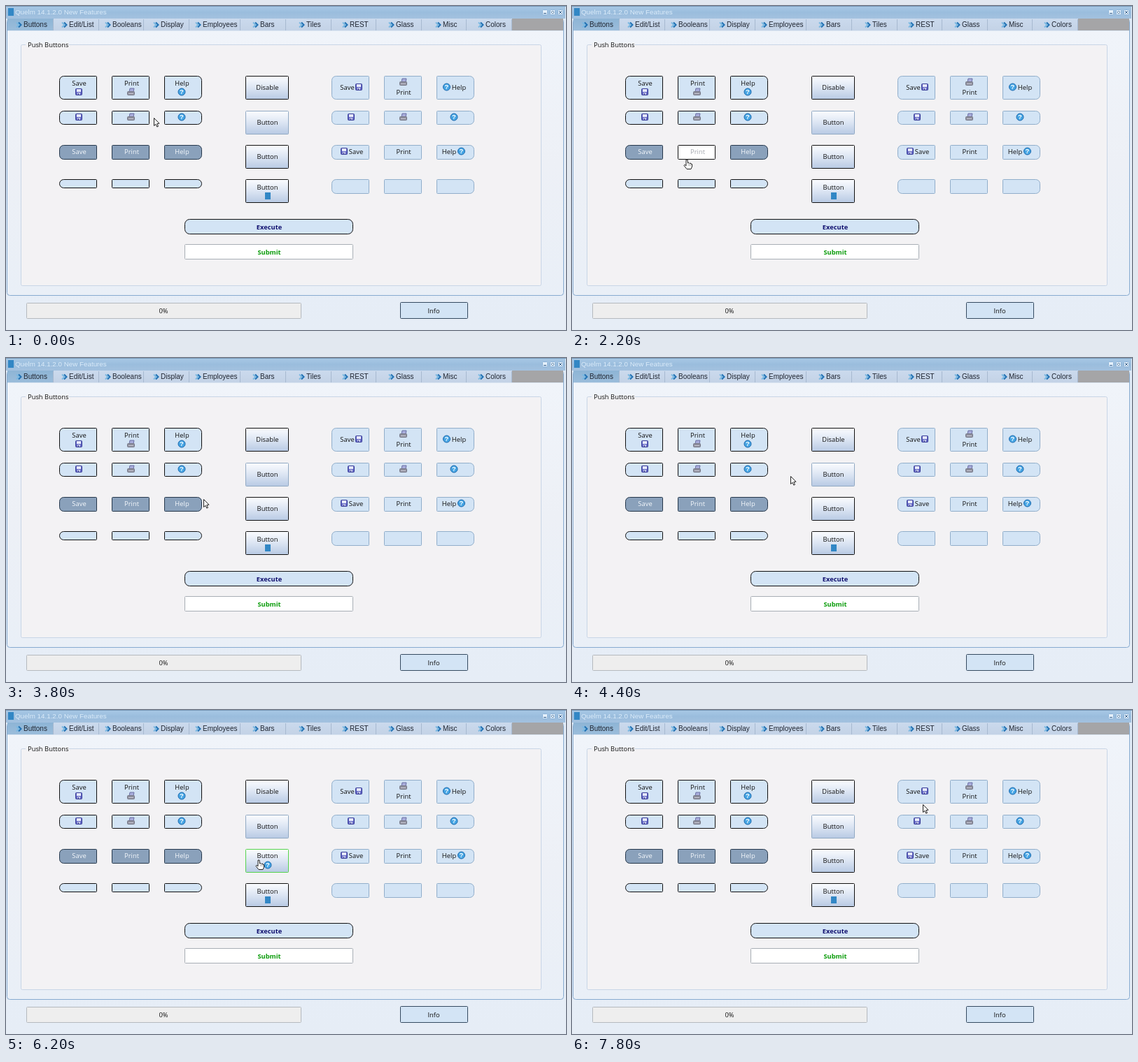
An HTML page with a canvas that plays this animation: 800 px wide and 464 px high, repeating every 8 s.

```html
<!DOCTYPE html>
<html lang="en">
<head>
<meta charset="utf-8">
<title>Button features</title>
<style>
  html, body { margin: 0; width: 100%; height: 100%; overflow: hidden; }
  canvas { display: block; width: 800px; height: 464px; }
</style>
</head>
<body>
<canvas id="stage" width="800" height="464"></canvas>
<script>
const ctx = document.getElementById('stage').getContext('2d');
const LOOP = 8000, STEP = 200;
const UI = '9.4px "Open Sans", sans-serif';
const BOLD = 'bold 9.3px "Open Sans", sans-serif';
const ARIAL = '10px "Liberation Sans", Arial, sans-serif';
const PALE = '#d3e4f5', DIM = '#8aa1bb';

// Pointer waypoints: time, x, y
const PATH = [
  [0, 211, 160], [1200, 106, 162], [1700, 108, 210], [2200, 164, 220], [2600, 250, 214],
  [3000, 242, 247], [4400, 312, 169], [5200, 364, 168], [6200, 361, 215],
  [6800, 370, 262], [7800, 501, 135]
];

// Name, left edge, chevron position
const tabs = [
  ['Buttons', 2, 14], ['Edit/List', 68, 79], ['Booleans', 133, 141], ['Display', 197, 210],
  ['Employees', 262, 270], ['Bars', 335, 352], ['Tiles', 400, 418], ['REST', 465, 480],
  ['Glass', 529, 546], ['Misc', 594, 613], ['Colors', 658, 674]
];
const labels = ['Save', 'Print', 'Help'];
const corners = [[6, 1, 1, 6], 1, [1, 6, 6, 1]];

function gradient(y0, y1, ...colors) {
  const g = ctx.createLinearGradient(0, y0, 0, y1);
  colors.forEach((c, i) => g.addColorStop(i / (colors.length - 1), c));
  return g;
}

function fillRect(x, y, w, h, fill) {
  ctx.fillStyle = fill;
  ctx.fillRect(x, y, w, h);
}

function box(x, y, w, h, fill, stroke, radius = 1) {
  ctx.beginPath();
  ctx.roundRect(x + .5, y + .5, w - 1, h - 1, radius);
  ctx.fillStyle = fill;
  ctx.fill();
  ctx.strokeStyle = stroke;
  ctx.lineWidth = 1;
  ctx.stroke();
}

function text(str, x, y, color = '#111', font = UI, align = 'center') {
  ctx.font = font;
  ctx.fillStyle = color;
  ctx.textAlign = align;
  ctx.fillText(str, x, y + 3.4);
}

function shape(points, fill, stroke, close = true) {
  ctx.beginPath();
  for (const [x, y] of points) ctx.lineTo(x, y);
  if (close) ctx.closePath();
  if (fill) { ctx.fillStyle = fill; ctx.fill(); }
  if (stroke) { ctx.strokeStyle = stroke; ctx.stroke(); }
}

const icons = {
  Save(x, y) {
    box(x - 5, y - 5, 10, 10, '#6367c4', '#3a3e98');
    fillRect(x - 3, y - 4, 6, 4, '#e6e9fb');
    fillRect(x - 2, y + 1, 4, 3, '#c2c5e6');
    fillRect(x - 1, y + 2, 1, 2, '#34388f');
  },
  Print(x, y) {
    shape([[x - 2, y - 5], [x + 4, y - 5], [x + 3, y], [x - 3, y]], '#a9addb', '#6b70a5');
    box(x - 6, y - 1, 11, 6, '#8f909f', '#777987');
    fillRect(x - 4, y + 2, 7, 1, '#c9c9d4');
  },
  Help(x, y) {
    ctx.beginPath();
    ctx.arc(x, y, 5, 0, 7);
    ctx.fillStyle = '#45a5e4';
    ctx.fill();
    ctx.strokeStyle = '#1d69ad';
    ctx.stroke();
    text('?', x, y, '#fff', 'bold 9.5px "Liberation Sans", sans-serif');
  }
};

function chevron(x, y) {
  ctx.lineWidth = 2;
  for (const dx of [0, 3]) {
    const p = x + dx;
    shape([[p, y - 3.5], [p + 3.5, y], [p, y + 3.5]], null, dx ? '#2272b4' : '#7bb9e2', false);
  }
  ctx.lineWidth = 1;
}

function drawWindow() {
  fillRect(0, 0, 800, 464, gradient(0, 464, '#dfeaf6', '#e7eef8', '#e6edf6'));
  fillRect(0, 0, 799, 18, gradient(0, 18, '#a9c9e6', '#9abddd', '#a3c1df'));
  fillRect(0, 0, 800, 1, '#7899b9');
  fillRect(3, 3, 8, 11, '#3287c5');
  text('Quelm 14.1.2.0 New Features', 13, 9, '#dcecfa', '9.8px "Liberation Sans", Arial, sans-serif', 'left');
  for (const x of [766, 777, 788]) box(x, 5, 8, 8, '#e4f0fb', '#8db3d8');
  fillRect(768, 10, 4, 1, '#39628d');
  box(779, 7, 4, 4, '#f2f8fd', '#4b759e');
  shape([[790, 7], [794, 11]], null, '#39628d', false);
  shape([[794, 7], [790, 11]], null, '#39628d', false);

  box(1, 18, 796, 397, gradient(35, 415, '#f0f4fa', '#edf0f6', '#e9eff7'), '#87abd0', 4);
  fillRect(723, 18, 73, 17, '#a5a5a7');
  tabs.forEach(([name, x, iconX], i) => {
    const end = i < 10 ? tabs[i + 1][1] : 723;
    const fill = i ? gradient(18, 35, '#cbdaed', '#c3d2e6') : gradient(18, 35, '#8db4d5', '#9bbddb');
    fillRect(x, 18, end - x, 17, fill);
    fillRect(end - 1, 19, 1, 16, '#a7b9d0');
    chevron(iconX + 1, 27);
    text(name, iconX + 11, 27, '#202632', ARIAL, 'left');
  });
  fillRect(2, 35, 794, 1, '#dce6f2');

  box(21, 55, 744, 346, '#f3f2f4', '#c8d5e6', 2);
  fillRect(28, 53, 62, 5, '#f2f3f6');
  text('Push Buttons', 31, 55.5, '#111', UI, 'left');

  box(29, 425, 393, 23, '#eeeeee', '#b5b9be');
  text('0%', 225, 436.5);
  box(563, 424, 97, 24, PALE, '#354a60');
  text('Info', 611, 436.5);
}

function drawLeft(hovered) {
  labels.forEach((name, i) => {
    const x = 76 + 75 * i, mid = x + 28.5, cx = x + 28;
    const shift = i == 2 ? 3 : 0;
    const button = (y, h, fill, stroke = '#111') => box(x, y, 54, h, fill, stroke, corners[i]);
    button(100, 34, PALE);
    text(name, mid - shift, 110.5);
    icons[name](cx - shift, 123);
    button(150, 20, hovered(x, 150, 54, 20) ? DIM : PALE);
    icons[name](cx - shift, 159);
    const white = hovered(x, 199, 54, 21);
    button(199, 21, white ? '#fff' : DIM, white ? '#111' : '#26384b');
    text(name, mid - shift, 209, white ? '#a5a9b0' : '#f4f8fc');
    button(248, 13, PALE);
  });
}

function drawMiddle(hovered) {
  [100, 150, 199, 248].forEach((y, i) => {
    const over = i && hovered(342, y, 62, 34);
    const green = i == 2 && over;
    box(342, y, 62, 34, gradient(y, y + 34, '#fcfdff', '#dce5f3', '#b7c9e3'),
      green ? '#55d34d' : i == 1 ? '#91a9c3' : '#111');
    text(i ? 'Button' : 'Disable', 373.5, green ? 209 : i == 3 ? 260 : y + 17);
    if (green) icons.Help(374, 222);
  });
  fillRect(370, 267, 8, 10, '#3287c5');
}

function drawRight() {
  labels.forEach((name, i) => {
    const x = 465 + 75 * i;
    [[100, 34], [150, 20], [199, 21], [248, 21]].forEach(([y, h]) =>
      box(x, y, 54, h, PALE, '#91aeca', corners[i]));
    icons[name](x + (i == 2 ? 25 : 28), 159);
  });
  text('Save', 487.5, 117);
  icons.Save(504, 116);
  icons.Print(568, 109);
  text('Print', 568, 124);
  icons.Help(629.5, 116);
  text('Help', 647, 117);
  icons.Save(483, 208);
  text('Save', 500, 209);
  text('Print', 568, 209);
  text('Help', 633, 209);
  icons.Help(650.5, 208);
}

function drawArrow(x, y) {
  ctx.lineWidth = 1;
  shape([[0, 0], [0, 11], [2.5, 8.8], [4.3, 12.6], [6, 11.8], [4.3, 8], [7.5, 7.7]]
    .map(([a, b]) => [x + a + .5, y + b + .5]), '#fff', '#222');
}

function drawHand(x, y) {
  ctx.lineWidth = 1;
  shape([[-1, 0], [1, 0], [1.5, 5], [3, 4.5], [4, 5.5], [5.5, 5], [6, 6.2], [7.5, 6.5],
    [7.5, 10], [6, 13.5], [0, 13.5], [-4, 8.5], [-3, 7.2], [-1, 8.8]]
    .map(([a, b]) => [x + a, y + b]), '#fff', '#222');
  fillRect(x + 2.7, y + 6, .7, 3, '#777');
  fillRect(x + 4.8, y + 6.5, .7, 2.5, '#777');
}

function pointerAt(t) {
  const next = PATH.findIndex(p => p[0] > t);
  if (next < 0) return PATH[PATH.length - 1].slice(1);
  const [t0, x0, y0] = PATH[next - 1], [t1, x1, y1] = PATH[next];
  const k = (t - t0) / (t1 - t0);
  return [Math.round(x0 + (x1 - x0) * k), Math.round(y0 + (y1 - y0) * k)];
}

function draw(t) {
  const [px, py] = pointerAt(t);
  let overButton = false;
  const hovered = (x, y, w, h) => {
    const hit = px >= x && px < x + w && py >= y && py < y + h + 2;
    overButton ||= hit;
    return hit;
  };
  drawWindow();
  drawLeft(hovered);
  drawMiddle(hovered);
  drawRight();
  box(255, 305, 241, 22, PALE, '#111', 7);
  text('Execute', 376, 316.5, '#10106f', BOLD);
  box(255, 341, 241, 22, '#fff', '#a8aeb5');
  text('Submit', 376, 352.5, '#0a9c0a', BOLD);
  (overButton ? drawHand : drawArrow)(px, py);
}

const start = performance.now();
function tick() {
  const t = (performance.now() - start) % LOOP;
  draw(Math.floor(t / STEP) * STEP);
  requestAnimationFrame(tick);
}
tick();
</script>
</body>
</html>
```
